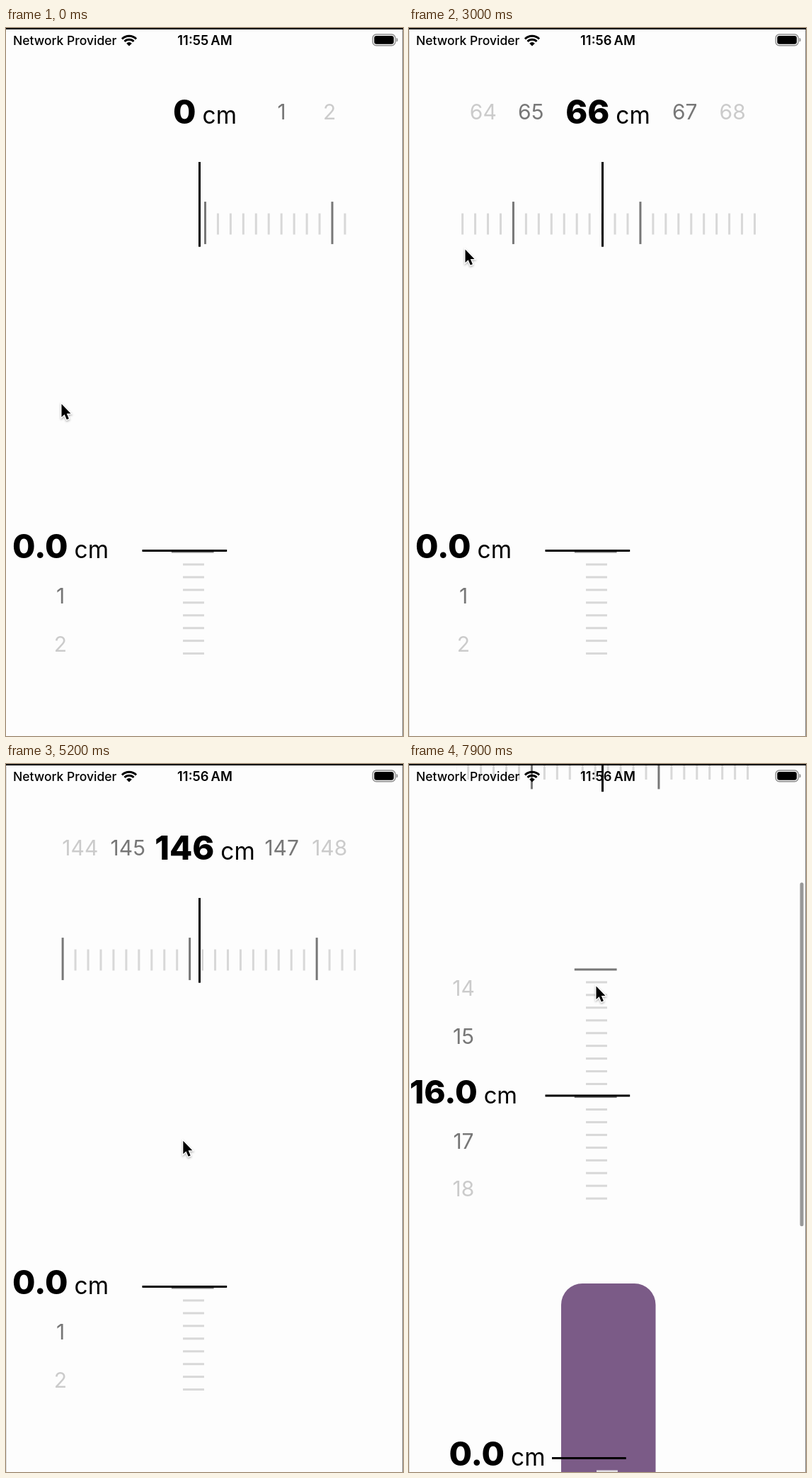
An HTML page with a canvas that plays this animation: 561 by 999 pixels, repeating every 8000 ms.

```html
<!DOCTYPE html>
<html lang="en">
<head>
<meta charset="utf-8">
<title>Ruler pickers</title>
<style>
  html, body { margin: 0; width: 100%; height: 100%; overflow: hidden; background: #fdfdfd; }
  canvas { display: block; width: 561px; height: 999px; }
</style>
</head>
<body>
<canvas id="stage" width="561" height="999"></canvas>
<script>
const ctx = document.getElementById('stage').getContext('2d');
const W = 561, H = 999, LOOP = 8000, STEP = 100;
const FONT = 'Inter, "Liberation Sans", sans-serif';
const INK = '#000', MID = '#777', PALE = '#d8d8d8', FAINT = '#cbcbcb';
const PT = W / 375;
const CM = 120 * PT, LINE = 2 * PT, NEEDLE = 80 * PT, MAJOR = 40 * PT, MINOR = 20 * PT;

function smooth(from, to, t) {
  const u = Math.min(1, Math.max(0, (t - from) / (to - from)));
  return u * u * (3 - 2 * u);
}

// Stops of the pointer: seconds, x, y
const stops = [
  [0, 78, 530], [0.47, 331, 276], [1.8, 186, 280], [3, 79, 312], [4.4, 283, 413],
  [5.4, 246, 545], [6.2, 240, 343], [6.9, 272, 567], [7.9, 264, 313]
];

function pointer(t) {
  let i = 0;
  while (i < stops.length - 2 && t >= stops[i + 1][0]) i++;
  const [a, ax, ay] = stops[i], [b, bx, by] = stops[i + 1];
  const u = smooth(a, b, t);
  const swiping = t > 0.47 && t < 3;
  const x = swiping ? 186 + 146 * Math.cos((t - 1.8) / 1.062 * 2 * Math.PI + Math.PI / 2)
                    : ax + (bx - ax) * u;
  return [x, ay + (by - ay) * u];
}

// Each flick adds a distance that dies away: [seconds, cm]
const flicks = [[1, 17.961], [2.07, 49.851], [3.968, 78.79]];
const topValue = t => flicks.reduce(
  (sum, [at, cm]) => sum + cm * (1 - Math.exp(-4.14 * Math.max(0, t - at))), 0);

function sideValue(t) {
  const u = Math.min(1, Math.max(0, (t - 7.2) / 0.7));
  return Math.round(160 * Math.pow(u, 1.5)) / 10;
}

function rect(x, y, w, h, color) {
  ctx.fillStyle = color;
  ctx.fillRect(x, y, w, h);
}

function pill(x, y, w, h, r, color) {
  ctx.fillStyle = color;
  ctx.beginPath();
  ctx.roundRect(x, y, w, h, r);
  ctx.fill();
}

function setFont(weight, size) {
  ctx.font = `${weight} ${size}px ${FONT}`;
}

function text(str, x, y, weight, size, color, align = 'center') {
  setFont(weight, size);
  ctx.fillStyle = color;
  ctx.textAlign = align;
  ctx.fillText(str, x, y);
}

// Number and unit, centred; the type shrinks when they pass the limit
function reading(str, cx, y, limit = Infinity) {
  const big = 47, small = 33.5, gap = 9;
  setFont(800, big);
  const a = ctx.measureText(str).width;
  setFont(400, small);
  const full = a + gap + ctx.measureText('cm').width;
  const k = Math.min(1, limit / full), x = cx - full * k / 2;
  text(str, x, y, 800, big * k, INK, 'left');
  text('cm', x + (a + gap) * k, y, 400, small * k, INK, 'left');
}

// Calls place(offset, isMajor) for each tick near the value
function ticks(value, place) {
  const mid = Math.round(value * 10);
  for (let k = Math.max(0, mid - 14); k <= mid + 14; k++)
    place((k / 10 - value) * CM, k % 10 === 0);
}

// Calls place(label, side, rank, colour) for two whole numbers on each side
function neighbours(value, place) {
  for (const side of [-1, 1])
    for (const rank of [1, 2]) {
      const n = Math.floor(value) + side * rank;
      if (n >= 0) place(String(n), side, rank, rank === 1 ? MID : FAINT);
    }
}

function clipped(x, y, w, h, draw) {
  ctx.save();
  ctx.beginPath();
  ctx.rect(x, y, w, h);
  ctx.clip();
  draw();
  ctx.restore();
}

function topRuler(value) {
  neighbours(value, (s, side, rank, color) =>
    text(s, 281 + side * (41.2 + 67.5 * rank), 128.5, 400, 30, color));
  reading(String(Math.floor(value)), 281, 135);
  clipped(67, 180, 427.4, 140, () => ticks(value, (o, major) => {
    const len = major ? MAJOR : MINOR;
    rect(281.5 + o - LINE / 2, 275 - len / 2 + (major ? 0 : 1.5), LINE, len, major ? MID : PALE);
  }));
  rect(272, 189, LINE, NEEDLE, INK);
}

function sideRuler(value) {
  neighbours(value, (s, side, rank, color) =>
    text(s, 77, 738 + side * (6.5 + 67.5 * rank), 400, 30, color));
  reading(value.toFixed(1), 77, 748, 152);
  clipped(180, 556, 150, 336, () => ticks(value, (o, major) => {
    const len = major ? MAJOR : MINOR;
    rect((major ? 263.7 : 265) - len / 2, 739 + o - LINE / 2, len, LINE, major ? MID : PALE);
  }));
  rect(192.5, 736, NEEDLE, LINE, INK);
}

function card() {
  pill(215, 1002.5, 133.5, 420, 30, '#7b5b87');
  reading('0.0', 124.5, 1259.5);
  rect(202, 1247.5, 70 * PT, LINE, INK);
  rect(265, 1266, MINOR, LINE, '#e2dfe4');
}

function wifi() {
  const cx = 174, cy = 25.5, a = Math.PI / 4;
  ctx.strokeStyle = ctx.fillStyle = INK;
  ctx.lineWidth = 3;
  for (const r of [9.2, 14.2]) {
    ctx.beginPath();
    ctx.arc(cx, cy, r, -Math.PI + a, -a);
    ctx.stroke();
  }
  ctx.beginPath();
  ctx.moveTo(cx, cy);
  ctx.arc(cx, cy, 5.4, -Math.PI + a, -a);
  ctx.fill();
}

function battery() {
  ctx.strokeStyle = '#8c8c8c';
  ctx.lineWidth = 1.4;
  ctx.beginPath();
  ctx.roundRect(518.2, 9, 31.8, 15.8, 5);
  ctx.stroke();
  pill(520.3, 11.1, 27.6, 11.6, 3.2, INK);
  pill(551.5, 14, 2, 5.5, [0, 2, 2, 0], '#8c8c8c');
}

function statusBar(t) {
  text('Network Provider', 10, 24, 500, 17.5, INK, 'left');
  wifi();
  text(t < 1 ? '11:55\u2009AM' : '11:56\u2009AM', 281, 24, 600, 18.4, INK);
  battery();
}

function cursor([x, y]) {
  ctx.save();
  ctx.translate(x + 0.5, y + 0.5);
  ctx.beginPath();
  [[0, 0], [0, 18.6], [4.2, 14.7], [7.3, 22], [10.4, 20.7], [7.3, 13.6], [13, 13.4]]
    .forEach(p => ctx.lineTo(...p));
  ctx.closePath();
  ctx.shadowColor = 'rgba(0,0,0,0.3)';
  ctx.shadowBlur = 3;
  ctx.shadowOffsetY = 1.5;
  ctx.lineWidth = 2.6;
  ctx.strokeStyle = '#fff';
  ctx.stroke();
  ctx.shadowColor = 'transparent';
  ctx.fillStyle = INK;
  ctx.fill();
  ctx.restore();
}

function draw(t) {
  const scroll = 269.5 * smooth(5.4, 6.413, t);
  rect(0, 0, W, H, '#fdfdfd');
  ctx.save();
  ctx.translate(0, -scroll);
  topRuler(topValue(t));
  sideRuler(sideValue(t));
  card();
  ctx.restore();
  if (scroll > 0) pill(552.5, 37 + scroll * 0.483, 5, 485, 2.5, '#989898');
  statusBar(t);
  rect(0, 0, W, 2, INK);
  if (t > 0) rect(0, 2, 1, H, '#dcdcdc');
  rect(560, 2, 1, H, '#858585');
  cursor(pointer(t));
}

const start = performance.now();
function frame() {
  const ms = (performance.now() - start) % LOOP;
  draw(Math.floor(ms / STEP) * STEP / 1000);
  requestAnimationFrame(frame);
}
frame();
</script>
</body>
</html>
```
